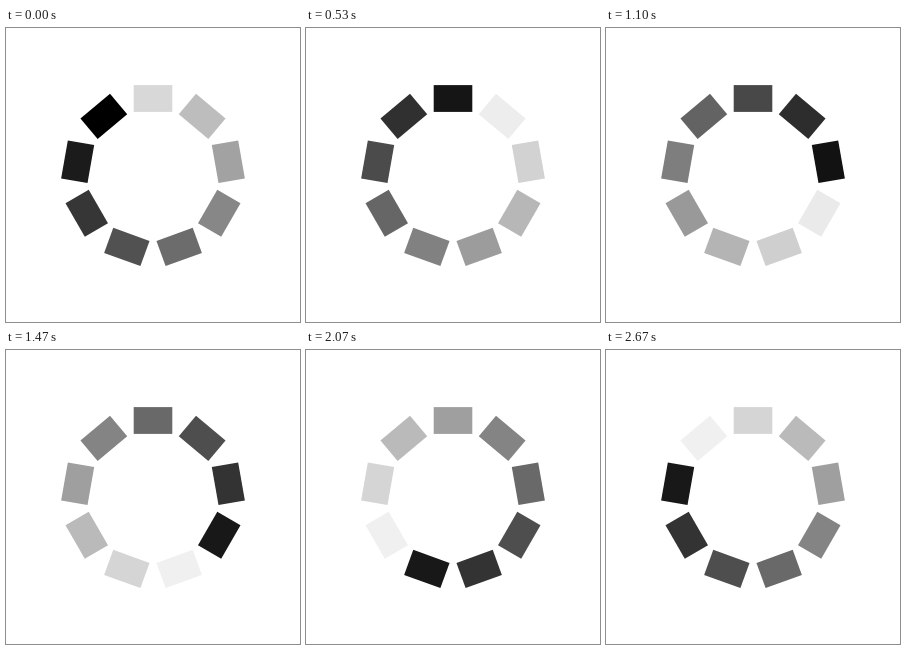
An HTML page with a canvas for the animation above (2.7 s loop, 294 by 294 pixels).

```html
<!DOCTYPE html>
<html lang="en">
<head>
<meta charset="utf-8">
<title>Loading spinner</title>
<style>
  html, body { margin: 0; width: 100%; height: 100%; overflow: hidden; background: #fff; }
  canvas { display: block; width: 294px; height: 294px; }
</style>
</head>
<body>
<canvas id="stage" width="294" height="294"></canvas>
<script>
const SIZE = 294;
const COUNT = 9;
const STEP = 300;
const RADIUS = 76.5;
const BAR_W = 38.6;
const BAR_H = 26.8;
const FADE = 27; // grey levels gained per step

const ctx = document.getElementById('stage').getContext('2d');

function drawBar(index, grey) {
  ctx.save();
  ctx.translate(SIZE / 2, SIZE / 2);
  ctx.rotate(index * 2 * Math.PI / COUNT);
  ctx.fillStyle = `rgb(${grey}, ${grey}, ${grey})`;
  ctx.fillRect(-BAR_W / 2, -RADIUS - BAR_H / 2, BAR_W, BAR_H);
  ctx.restore();
}

function draw(time) {
  const head = (time / STEP + COUNT - 1) % COUNT;
  ctx.fillStyle = '#fff';
  ctx.fillRect(0, 0, SIZE, SIZE);
  for (let i = 0; i < COUNT; i++) {
    // Each bar snaps to black as the head arrives, then fades out linearly.
    const age = (head - i + COUNT) % COUNT;
    drawBar(i, Math.round(age * FADE));
  }
}

function tick() {
  draw(performance.now() % (COUNT * STEP));
  requestAnimationFrame(tick);
}

draw(0);
requestAnimationFrame(tick);
</script>
</body>
</html>
```
